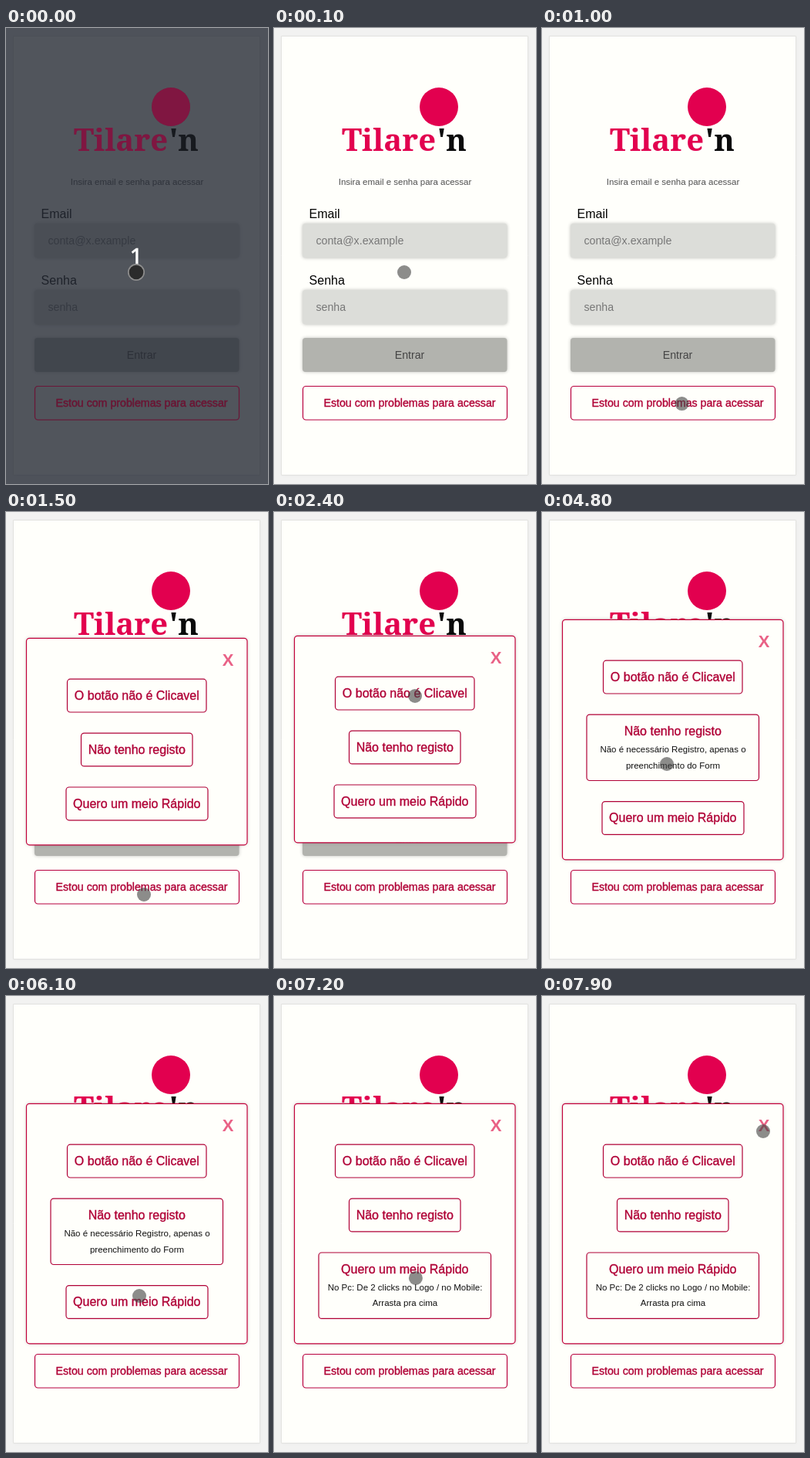
An HTML page with a canvas that plays this animation: 340x590 px, repeating every 8000 ms.

```html
<!DOCTYPE html>
<html lang="pt">
<head>
<meta charset="utf-8">
<title>Login</title>
<style>
html, body { margin: 0; width: 340px; height: 590px; overflow: hidden; background: #f2f2f1; }
canvas { display: block; }
</style>
</head>
<body>
<canvas id="stage" width="340" height="590"></canvas>
<script>
const ctx = document.getElementById('stage').getContext('2d');
const LOOP = 8000, TICK = 100;
const SANS = '"Liberation Sans", Arial, sans-serif';
const PAPER = '#fffffb', CRIMSON = '#b00036', BRAND = '#e2004f';

// Pointer moves: start time, number of ticks, end point, optional curve control
const START = [169, 316];
const MOVES = [
  { at: 500, ticks: 7, to: [179, 495], via: [206, 405] },
  { at: 1900, ticks: 6, to: [183, 238], via: [325, 366] },
  { at: 4000, ticks: 1, to: [167, 303] },
  { at: 4200, ticks: 2, to: [162, 326] },
  { at: 5400, ticks: 8, to: [173, 388], via: [376, 372] },
  { at: 7200, ticks: 5, to: [287, 147] },
  { at: 7800, ticks: 2, to: [287, 175] }
];

const OPTIONS = [
  { title: 'O botão não é Clicavel', x: 79.5, w: 180.5, opens: 2900, closes: 4800, gap: 22,
    lines: ['Você precisa preencher o Formulário', 'para que o Botão seja liberado'] },
  { title: 'Não tenho registo', x: 97.5, w: 144.5, opens: 4800, closes: 6700, gap: 21,
    lines: ['Não é necessário Registro, apenas o', 'preenchimento do Form'] },
  { title: 'Quero um meio Rápido', x: 78, w: 184, opens: 6700, closes: LOOP, gap: 20,
    lines: ['No Pc: De 2 clicks no Logo / no Mobile:', 'Arrasta pra cima'] }
];

function text(str, x, y, size, color, { align = 'left', font = SANS, weight = '', heavy = 0 } = {}) {
  ctx.font = `${weight} ${size}px ${font}`;
  ctx.textAlign = align;
  ctx.fillStyle = color;
  ctx.fillText(str, x, y);
  if (heavy) {
    ctx.strokeStyle = color;
    ctx.lineWidth = heavy;
    ctx.strokeText(str, x, y);
  }
}

function box(x, y, w, h, { fill, stroke, line = 1.2, radius = 4, blur = 0, shade = 0.25 }) {
  ctx.beginPath();
  ctx.roundRect(x, y, w, h, radius);
  if (fill) {
    ctx.save();
    ctx.shadowColor = `rgba(0,0,0,${shade})`;
    ctx.shadowBlur = blur;
    ctx.fillStyle = fill;
    ctx.fill();
    ctx.restore();
  }
  if (stroke) {
    ctx.strokeStyle = stroke;
    ctx.lineWidth = line;
    ctx.stroke();
  }
}

function disc(x, y, r, fill) {
  ctx.beginPath();
  ctx.arc(x, y, r, 0, Math.PI * 2);
  ctx.fillStyle = fill;
  ctx.fill();
}

function drawLogo() {
  const style = { font: '"Noto Serif", serif', weight: 'bold' };
  disc(214, 102, 25, BRAND);
  text('Tilare', 88, 159, 40, BRAND, style);
  text("'n", 250, 159, 40, '#0a0a0a', { ...style, align: 'right' });
}

function drawHelpButton() {
  box(37.5, 463.5, 265, 43.5, { stroke: '#b8003e' });
  text('Estou com problemas para acessar', 176, 490, 14.2, CRIMSON, { align: 'center', heavy: 0.35 });
}

function drawField(label, hint, y) {
  text(label, 45.6, y - 7, 16, '#000');
  box(37, y, 265.5, 44.5, { fill: '#dcddd9', blur: 4 });
  text(hint, 54.5, y + 27, 14.2, '#777');
}

function drawPage(t) {
  ctx.fillStyle = '#f2f2f1';
  ctx.fillRect(0, 0, 340, 590);
  box(9.5, 10.5, 320, 568, { fill: PAPER, stroke: '#e2e2e0', line: 1, radius: 0, blur: 4, shade: 0.04 });
  drawLogo();
  text('Insira email e senha para acessar', 170, 203, 11.5, '#505050', { align: 'center' });
  drawField('Email', 'conta@x.example', 253);
  drawField('Senha', 'senha', 339);
  box(37, 401, 265.5, 44, { fill: '#b2b3ae', blur: 4 });
  text('Entrar', 176, 428, 14.2, '#444', { align: 'center' });
  drawHelpButton();
  if (t >= 1300 && t < 1500) {
    ctx.fillStyle = '#222';
    ctx.fillRect(55, 268, 1, 16);
  }
}

function drawPopup(t) {
  const top = t < 1700 ? 163 : t < 2900 ? 160 : 139;
  const height = t < 2900 ? 267.5 : 310.5;
  box(26.5, top + 0.3, 286.5, height, { fill: PAPER, stroke: '#c2003a', blur: 5, shade: 0.2 });
  text('X', 288, top + 36, 22, '#e96286', { align: 'center', weight: 'bold' });

  let y = top + 53.2;
  for (const o of OPTIONS) {
    const open = t >= o.opens && t < o.closes;
    const h = open ? 85.4 : 42.8;
    const row = Math.floor(y);
    box(open ? 58 : o.x, y, open ? 223.5 : o.w, h, { stroke: CRIMSON });
    text(o.title, 169.8, row + 27, 16, CRIMSON, { align: 'center', heavy: 0.35 });
    if (open) o.lines.forEach((line, i) =>
      text(line, 170, row + 49 + i * o.gap, 11.5, '#111', { align: 'center' }));
    y += h + 27.1;
  }
}

function pointerAt(t) {
  let from = START;
  for (const { at, ticks, to, via } of MOVES) {
    if (t < at) break;
    const p = Math.min(1, ((t - at) / TICK + 1) / ticks);
    const e = (1 - Math.cos(Math.PI * p)) / 2;
    const start = from;
    from = to.map((end, i) => {
      const mid = via ? via[i] : (start[i] + end) / 2;
      return (1 - e) ** 2 * start[i] + 2 * e * (1 - e) * mid + e * e * end;
    });
  }
  return from;
}

function drawCountdown() {
  ctx.fillStyle = 'rgba(38,43,53,.8)';
  ctx.fillRect(0, 0, 340, 590);
  ctx.globalAlpha = 0.35;
  drawLogo();
  drawHelpButton();
  ctx.globalAlpha = 1;
  text('1', 169, 307, 30, '#fff', { align: 'center', font: '"Noto Sans", sans-serif', heavy: 0.6 });
  disc(169, 316, 11, '#8e8e8e');
  disc(169, 316, 9.3, '#2b2b2b');
}

function render(now) {
  const t = Math.floor((now % LOOP) / TICK) * TICK;
  drawPage(t);
  if (t < 100) {
    drawCountdown();
  } else {
    if (t >= 1500) drawPopup(t);
    disc(...pointerAt(t), 9, 'rgba(64,64,64,.6)');
  }
}

const origin = performance.now();
function frame() {
  render(performance.now() - origin);
  requestAnimationFrame(frame);
}
frame();
</script>
</body>
</html>
```
